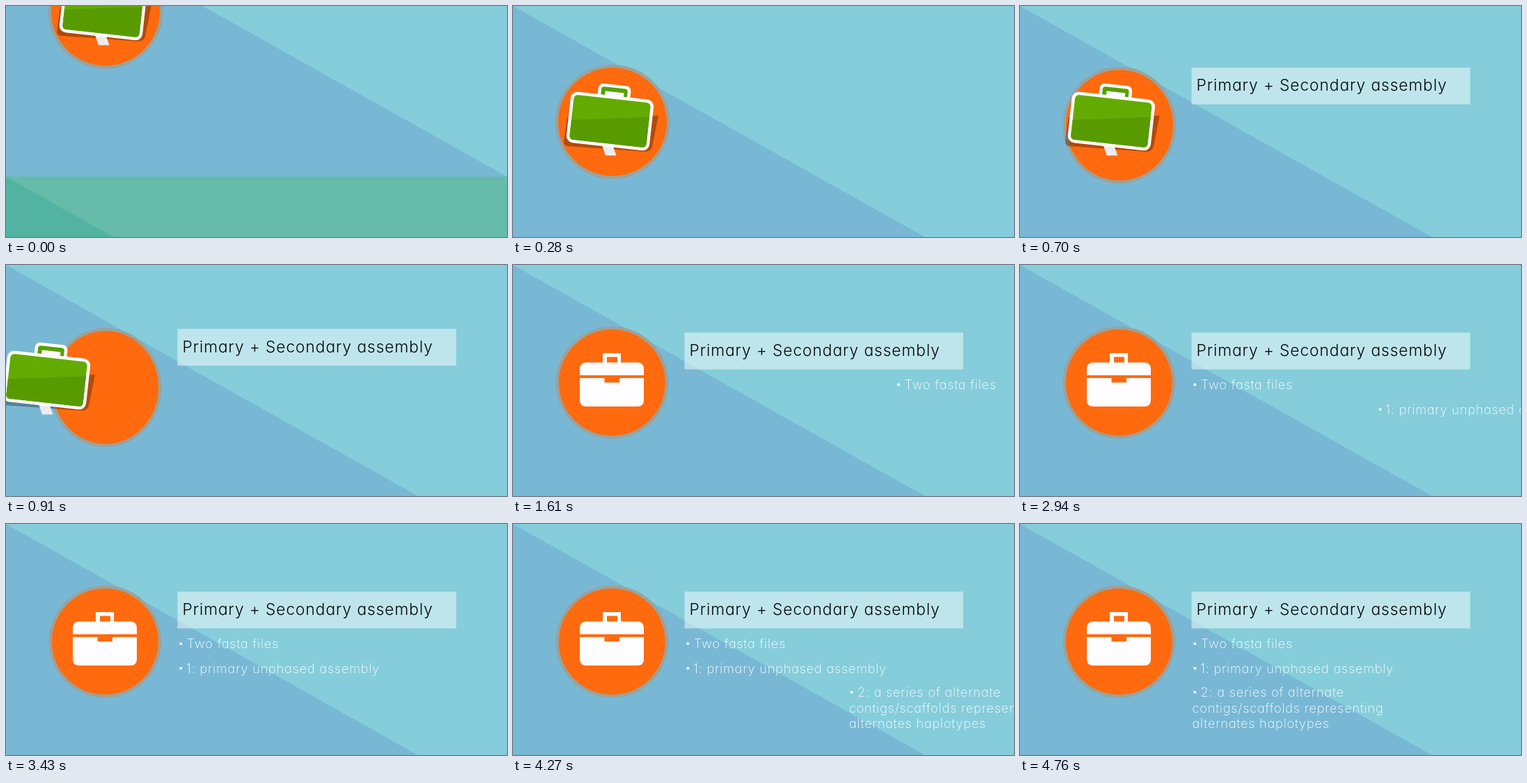
Animation, 720 px wide and 333 px high, one loop 6.3 s. Source, as an HTML page:

```html
<!DOCTYPE html>
<html lang="en">
<head>
<meta charset="utf-8">
<title>Primary + Secondary assembly</title>
<style>
  html, body { margin: 0; width: 100%; height: 100%; overflow: hidden; background: #85cddb; }
  svg { display: block; width: 100%; height: 100%; }
  text { font-family: Inter, Lato, sans-serif; font-feature-settings: "cv11"; white-space: pre; }
  .head { font-size: 22.8px; font-weight: 300; letter-spacing: .9px; fill: #06090b; }
  .item { font-size: 18.2px; font-weight: 200; letter-spacing: .8px; fill: #fff; }
</style>
</head>
<body>
<svg viewBox="0 0 720 333" preserveAspectRatio="none">
  <g id="slide">
    <rect width="720" height="405" fill="#85cddb"/>
    <path d="M0 0L720 405H0Z" fill="#78b8d5"/>

    <g id="disc">
      <ellipse id="ring" fill="#9ba29a"/>
      <ellipse id="face" fill="#ff6a0e"/>
    </g>

    <g id="whiteBag">
      <path fill="#fdfcfe" fill-rule="evenodd" d="M129 141V127H155V141ZM135 141H150V132.500H135Z"/>
      <path fill="#fdfcfe" d="M96 159V150Q96 140.500 105.500 140.500H178.500Q188 140.500 188 150V159Z"/>
      <path fill="#fdfcfe" d="M96 163H131.500V169.500H153V163H188V195Q188 204 178.500 204H105.500Q96 204 96 195Z"/>
    </g>

    <g id="greenBag">
      <path d="M78 160L73 195Q73 201 79 202L190 210Q198 210 200 203L209 158Z" opacity=".3"/>
      <path d="M128 201L144 203L148.500 215.500H133Z" fill="#ececf0"/>
      <g transform="translate(139.500 166) rotate(6.3)">
        <rect x="-22" y="-53" width="47" height="32" rx="7" fill="#fff"/>
        <rect x="-17.500" y="-48.500" width="38" height="24" rx="4" fill="#57a000"/>
        <rect x="-11.500" y="-42.500" width="27" height="14" fill="#fbfbfd"/>
        <rect x="-60" y="-37" width="120" height="74" rx="10" fill="#fff"/>
        <rect x="-55.500" y="-32.500" width="111" height="65" rx="6" fill="#63ab00"/>
        <path d="M-55.500 4L55.500 -12V26.500Q55.500 32.500 49.500 32.500H-49.500Q-55.500 32.500 -55.500 26.500Z" fill="#589b00"/>
      </g>
    </g>

    <g id="header">
      <rect x="246.500" y="97.500" width="400.500" height="53" fill="#fff" opacity=".47"/>
      <text class="head" x="253.500" y="131">Primary + Secondary assembly</text>
    </g>

    <g id="item0" class="item">
      <circle cx="251.300" cy="172.500" r="2"/>
      <text x="260" y="179">Two fasta files</text>
    </g>
    <g id="item1" class="item">
      <circle cx="251.300" cy="208" r="2"/>
      <text x="259" y="214.500">1: primary unphased assembly</text>
    </g>
    <g id="item2" class="item">
      <circle cx="251.300" cy="242.500" r="2"/>
      <text x="259.500" y="249">2: a series of alternate</text>
      <text x="247.500" y="271.500">contigs/scaffolds representing</text>
      <text x="247.500" y="294">alternates haplotypes</text>
    </g>
  </g>

  <g id="nextSlide">
    <rect width="720" height="405" fill="#66bca9"/>
    <path d="M0 0L720 405H0Z" fill="#53b3a3"/>
  </g>
</svg>
<script>
  const LOOP = 6300, STEP = 70, SLIDE_H = 405, ITEM_TRAVEL = 472;
  const $ = id => document.getElementById(id);
  const clamp = v => Math.min(1, Math.max(0, v));
  const move = (id, x, y) => $(id).setAttribute("transform", `translate(${x.toFixed(2)} ${y.toFixed(2)})`);
  const show = (id, on) => $(id).setAttribute("display", on ? "inline" : "none");

  // Share of the way still to go; negative while overshooting.
  function backLeft(p, s) {
    const u = 1 - clamp(p);
    return u * u * ((s + 1) * u - s);
  }

  // Disc pose: time, centre x, centre y, radius x, radius y.
  const discKeys = [
    [490, 143, 167, 78, 78],
    [910, 143, 176.5, 76, 81.5],
    [1050, 142.3, 169.5, 76.5, 76.5]
  ];

  function discPose(t) {
    const last = discKeys.length - 1;
    if (t <= discKeys[0][0]) return discKeys[0];
    if (t >= discKeys[last][0]) return discKeys[last];
    const i = discKeys.findIndex(k => k[0] > t);
    const a = discKeys[i - 1], b = discKeys[i];
    const p = (t - a[0]) / (b[0] - a[0]);
    const e = p * p * (3 - 2 * p);
    return a.map((v, n) => v + (b[n] - v) * e);
  }

  function setEllipse(id, cx, cy, rx, ry) {
    Object.entries({ cx, cy, rx, ry }).forEach(([k, v]) => $(id).setAttribute(k, v.toFixed(2)));
  }

  const itemStarts = [1570, 2890, 4211];

  function draw(time) {
    const t = Math.floor((time % LOOP) / STEP) * STEP;

    const lift = 159 * (1 - clamp(t / 280)) ** 2;
    move("slide", 0, -lift);
    move("nextSlide", 0, SLIDE_H - lift);
    show("nextSlide", t < 280);

    const [, cx, cy, rx, ry] = discPose(t);
    setEllipse("face", cx, cy, rx, ry);
    setEllipse("ring", cx, cy, rx + 4.5, ry + 4.5);

    const exit = Math.max(0, (t - 490) / 420);
    move("greenBag", -81 * exit ** 3.3, 0);
    show("greenBag", t < 1050);
    show("whiteBag", t >= 980);

    show("header", t >= 560);
    move("header", 0, 240 * backLeft((t - 514) / 455, 1.7));

    itemStarts.forEach((start, i) => {
      show("item" + i, t >= start);
      move("item" + i, ITEM_TRAVEL * backLeft((t - start) / 540, 2.4), 0);
    });
  }

  let origin = null;
  function tick(now) {
    if (origin === null) origin = now;
    draw(Math.max(0, now - origin));
    requestAnimationFrame(tick);
  }
  draw(0);
  requestAnimationFrame(tick);
</script>
</body>
</html>
```
